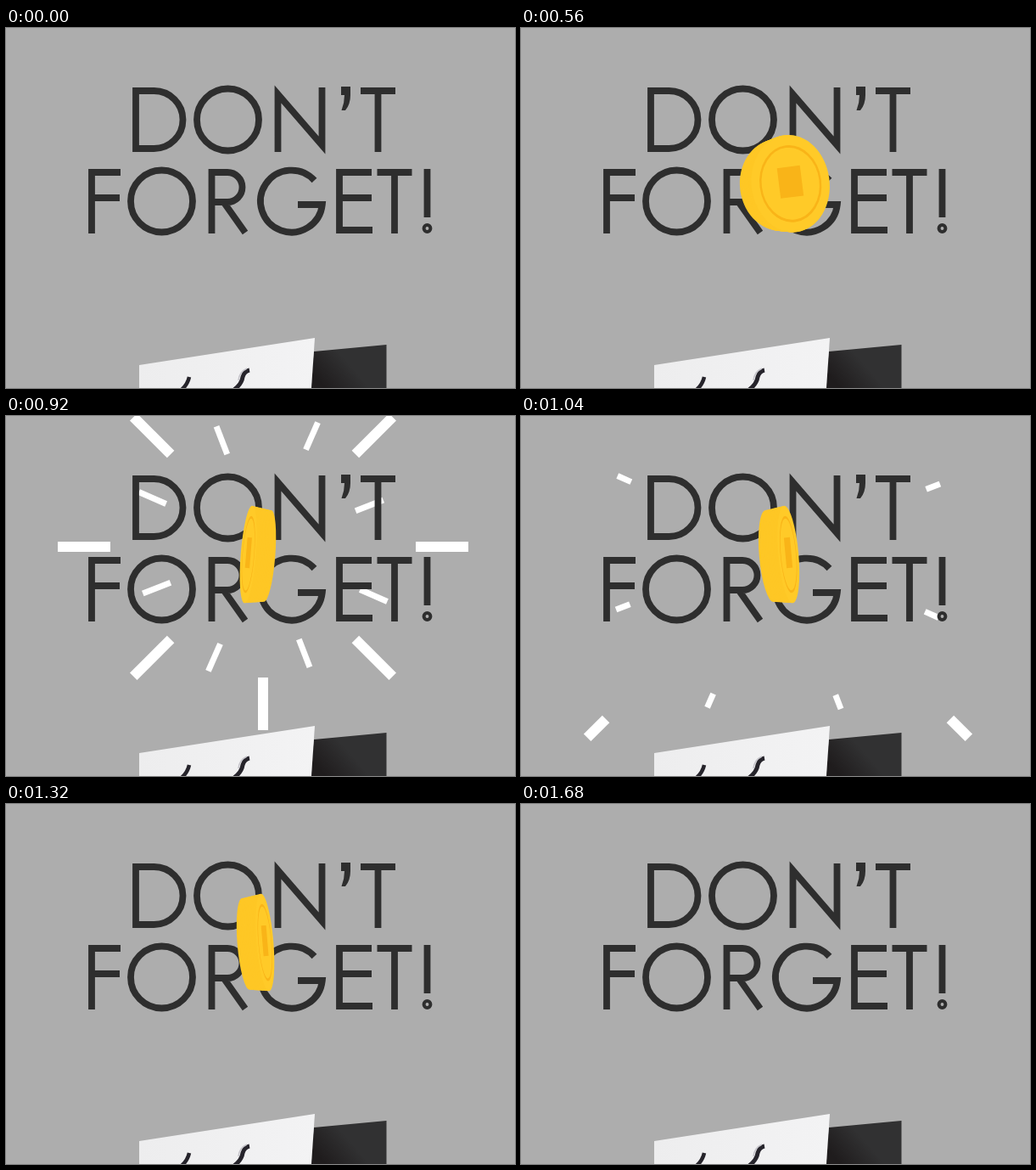
These frames come from a looping animation (600x424 px, 3000 ms). An HTML page with a canvas:

```html
<!DOCTYPE html>
<html lang="en">
<head>
<meta charset="utf-8">
<title>Don't forget!</title>
<style>
  html, body { margin: 0; width: 100%; height: 100%; overflow: hidden; background: #adadad; }
  canvas { display: block; }
</style>
</head>
<body>
<canvas id="stage" width="600" height="424" role="img" aria-label="Don't forget!"><h1>DON’T FORGET!</h1></canvas>
<script>
const ctx = document.getElementById('stage').getContext('2d');
const LOOP = 3000, STEP = 40;
const SHOW = 440, HIDE = 1680;
const TURN = Math.PI * 2;

// Geometric capitals: advance and pen path, from the top left of the pen line
const LETTERS = {
  D: [72, 'M0 0H21.5A34 34 0 0 1 21.5 68H0Z'],
  O: [95.5, 'M0 34A36.5 36.5 0 0 1 73 34A36.5 36.5 0 0 1 0 34Z'],
  N: [79.5, 'M0 72V4L52 64V-4'],
  T: [59, 'M0 0H41M20.5 0V72'],
  F: [46, 'M0 72V0H34M0 30H33'],
  R: [57.5, 'M0 72V0H18.5A17.5 17.5 0 0 1 18.5 35H0M14 35L39.5 71'],
  G: [93, 'M63.5 9.5A36.5 36.5 0 1 0 72.8 38H44'],
  E: [44.5, 'M38 0H0V68H39M0 30H38'],
  '!': [0, 'M0 -4V53M-2 66A2 2 0 0 1 2 66A2 2 0 0 1 -2 66Z']
};
const APOSTROPHE = [18, 'M-5 -5H6V5Q6 16 0 23H-4.5Q-1 14 -1 5H-5Z'];

const clamp = v => Math.max(0, Math.min(1, v));
const lerp = (a, b, u) => a + (b - a) * u;

function write(text, x, y) {
  ctx.save();
  ctx.translate(x, y);
  ctx.strokeStyle = ctx.fillStyle = '#2e2e2e';
  ctx.lineWidth = 7.8;
  for (const char of text) {
    const [advance, path] = LETTERS[char] || APOSTROPHE;
    if (LETTERS[char]) ctx.stroke(new Path2D(path));
    else ctx.fill(new Path2D(path));
    ctx.translate(advance, 0);
  }
  ctx.restore();
}

function shade(x0, y0, x1, y1, from, to) {
  const g = ctx.createLinearGradient(x0, y0, x1, y1);
  g.addColorStop(0, from);
  g.addColorStop(1, to);
  return g;
}

function fill(path, color) {
  ctx.fillStyle = color;
  ctx.fill(new Path2D(path));
}

function line(path, color, width) {
  ctx.strokeStyle = color;
  ctx.lineWidth = width;
  ctx.stroke(new Path2D(path));
}

function drawBag() {
  fill('M363 381L448.5 373V424H358Z', shade(366, 412, 396, 386, '#1f1c1d', '#313132'));
  fill('M157 397L364 365L360 424H157Z', shade(157, 0, 364, 0, '#ededee', '#f3f3f4'));
  line('M207 426Q214 420 216 411', '#26242b', 4.5);
  line('M269 426Q278 419 279 411Q281 404 287 403', '#26242b', 5);
  line('M274 415Q275 405 284 401', '#c4c3c9', 1.5);
}

function ray(angle, reach, length, width) {
  if (length <= 0) return;
  ctx.save();
  ctx.translate(303, 154);
  ctx.rotate(-angle);
  ctx.fillStyle = '#fff';
  ctx.fillRect(reach - length, -width / 2, length, width);
  ctx.restore();
}

// Eight long rays on the compass points, eight short ones between them
function drawRays(t) {
  if (t < 680) return;
  const u = (t - 720) / 200;
  const fade = clamp((1120 - t) / 160);
  for (let k = 0; k < 8; k++) {
    const angle = k * TURN / 8;
    const odd = k % 2 ? 1 : -1;
    const wide = 26 * Math.max(0, Math.cos(2 * angle));
    ray(angle + 0.37, lerp(73 + 9 * odd, 156 + 4 * odd, u),
      35 * Math.min(fade, clamp(lerp(0.23, 1, u))), 7);
    ray(angle, lerp(46, 216 + wide, u), 62 * Math.min(fade, clamp(u)), 12);
  }
}

// Time, spin in degrees, x
const poses = [[440, -90, 313], [720, 206, 308], [920, 459, 297],
  [1160, 777, 311], [1320, 980, 294], [1520, 1238, 311]];

function pose(t) {
  let i = 0;
  while (i < poses.length - 2 && t >= poses[i + 1][0]) i++;
  const [t0, spin0, x0] = poses[i], [t1, spin1, x1] = poses[i + 1];
  const u = (t - t0) / (t1 - t0);
  const rise = clamp((720 - t) / 280), fall = Math.max(0, (t - 1320) / 320);
  return {
    angle: lerp(spin0, spin1, u) * TURN / 360,
    x: lerp(x0, x1, Math.min(u, 1)),
    y: 164 + 108 * rise ** 3 + 210 * fall ** 4
  };
}

function oval(x, rx, ry) {
  ctx.beginPath();
  ctx.ellipse(x, 0, rx, ry, 0, 0, TURN);
}

function drawCoin(t) {
  if (t < SHOW || t >= HIDE) return;
  const { angle, x, y } = pose(t);
  const flip = Math.cos(angle) < 0 ? -1 : 1;
  const turn = Math.sin(angle) * flip, open = Math.abs(Math.cos(angle));
  const radius = 57.5, shift = turn * 11.5;

  ctx.save();
  ctx.translate(x, y);
  ctx.rotate(-turn * (0.05 + 0.2 * open));
  // Stacked slices give the rim its thickness
  for (let k = 0; k <= 1; k += 1 / 16) {
    ctx.fillStyle = k < 1 ? '#fec725' : '#ffca28';
    oval(lerp(-shift, shift, k), Math.max(radius * open, 2), radius * lerp(0.94, 1, k));
    ctx.fill();
  }
  ctx.translate(shift, 0);
  ctx.scale(open, 1);
  ctx.strokeStyle = ctx.fillStyle = '#f9b418';
  ctx.lineWidth = 3;
  oval(0, 44, 44);
  ctx.stroke();
  ctx.fillRect(-17, -20, 34, 36);
  ctx.restore();
}

function draw(now) {
  const t = Math.floor((now % LOOP) / STEP) * STEP;
  ctx.fillStyle = '#adadad';
  ctx.fillRect(0, 0, 600, 424);
  drawBag();
  drawRays(t);
  write('DON’T', 153, 74);
  write('FORGET!', 101, 170);
  drawCoin(t);
}

let start;
function tick(now) {
  start ??= now;
  draw(now - start);
  requestAnimationFrame(tick);
}
draw(0);
requestAnimationFrame(tick);
</script>
</body>
</html>
```
